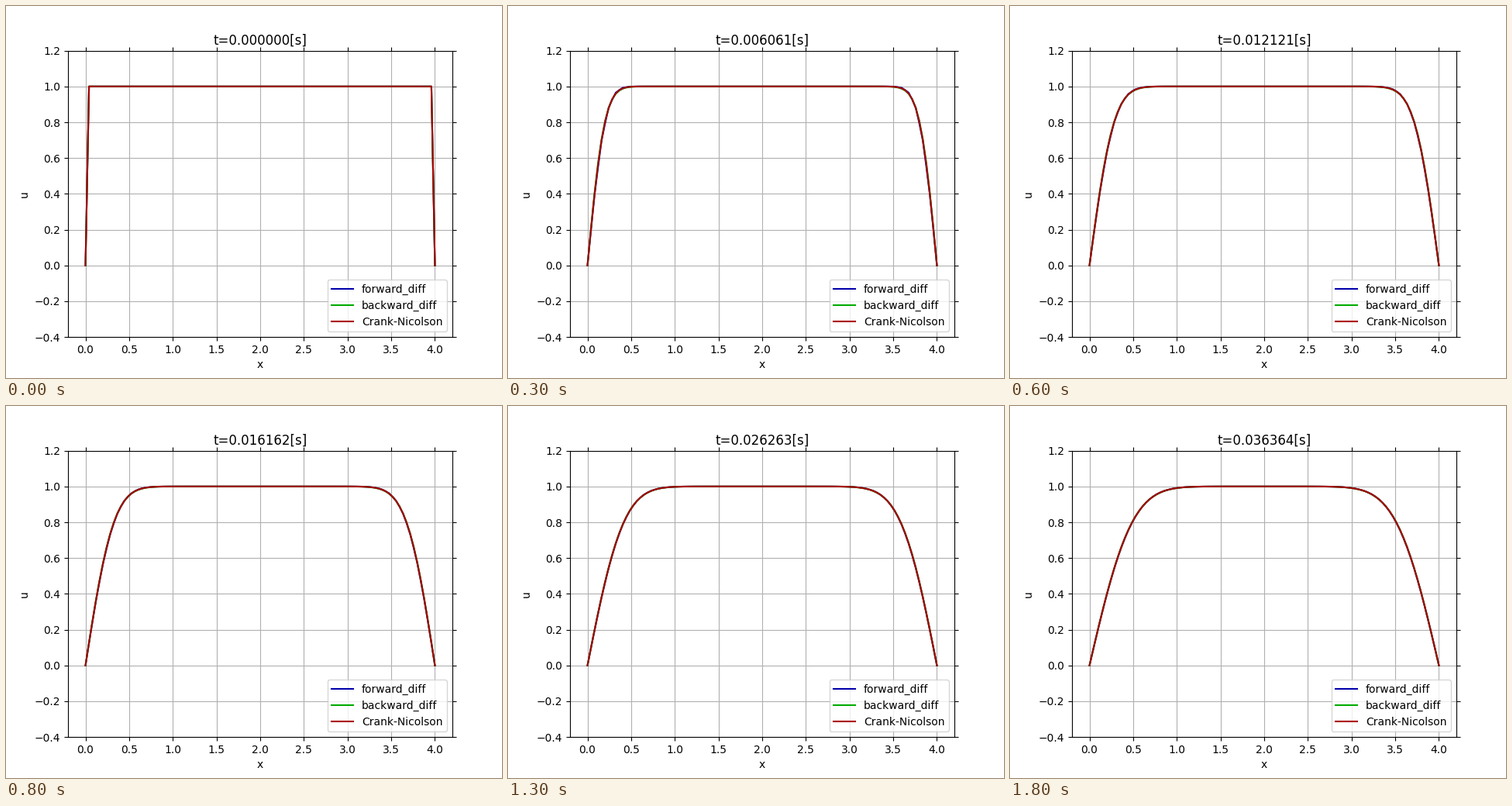
Recreate the animation shown at these times as a matplotlib script. Size 640 by 480 pixels, loop 1900 ms.

```python
import numpy as np
import matplotlib.pyplot as plt
from matplotlib.animation import FuncAnimation

# Heat equation u_t = D u_xx with fixed zero ends, solved by three schemes
N = 100
D = 2.0
FRAMES = 19
STEPS_PER_FRAME = 5

x = np.linspace(0, 4, N)
dx = x[1] - x[0]
dt = 0.04 / (N - 1)
r = D * dt / dx**2

eye = np.eye(N)
lap = np.diag(np.full(N, -2.0)) + np.eye(N, k=1) + np.eye(N, k=-1)
lap[[0, -1]] = 0

forward = eye + r * lap
backward = np.linalg.inv(eye - r * lap)
crank = np.linalg.solve(eye - r / 2 * lap, eye + r / 2 * lap)


def solve(step):
    """Return the profile at every displayed time."""
    u = np.ones(N)
    u[[0, -1]] = 0
    jump = np.linalg.matrix_power(step, STEPS_PER_FRAME)
    history = [u]
    for _ in range(FRAMES - 1):
        u = jump @ u
        history.append(u)
    return history


schemes = [
    ("forward_diff", "#0000aa", solve(forward)),
    ("backward_diff", "#00aa00", solve(backward)),
    ("Crank-Nicolson", "#aa0000", solve(crank)),
]

fig, ax = plt.subplots(figsize=(6.4, 4.8), dpi=100)
lines = [ax.plot(x, hist[0], color=color, label=label)[0]
         for label, color, hist in schemes]
ax.set_xlim(-0.2, 4.2)
ax.set_ylim(-0.4, 1.2)
ax.set_xticks(np.arange(0, 4.1, 0.5))
ax.set_xlabel("x")
ax.set_ylabel("u")
ax.tick_params(top=True, right=True)
ax.grid(True)
ax.legend(loc="lower right")
title = ax.set_title("", y=1.0)


def update(i):
    for line, (_, _, hist) in zip(lines, schemes):
        line.set_ydata(hist[i])
    title.set_text(f"t={i * STEPS_PER_FRAME * dt:.6f}[s]")
    return [*lines, title]


anim = FuncAnimation(fig, update, frames=FRAMES, interval=100, repeat=True)
plt.show()
```
